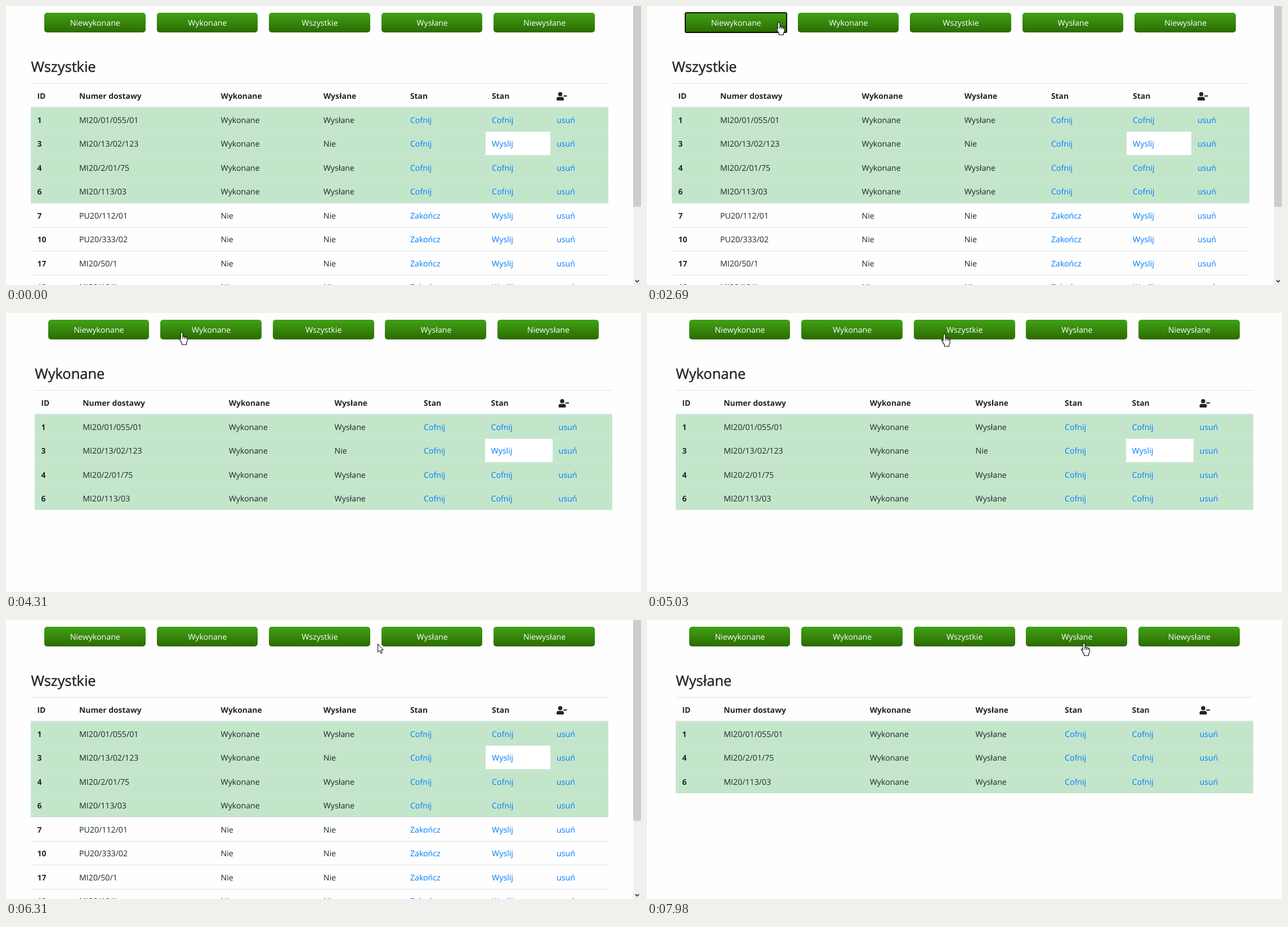
These frames come from a looping animation (1128 by 496 pixels, 8000 ms). An HTML page:

```html
<!DOCTYPE html>
<html lang="pl">
<head>
<meta charset="utf-8">
<title>Dostawy</title>
<style>
  html, body { margin: 0; width: 100%; height: 100%; overflow: hidden; background: #fefefe; }
  svg { display: block; width: 1128px; height: 496px; }
  text { font: 14.2px "Open Sans", "Noto Sans", sans-serif; fill: #212529; text-rendering: geometricPrecision; white-space: pre; }
  .bold { font-size: 13.9px; font-weight: 700; }
  .title { font-size: 25.4px; stroke: #212529; stroke-width: .45; }
  .link { fill: #007bff; }
  .label { fill: #fff; text-anchor: middle; }
  .line { fill: #dee2e6; }
  .focus { fill: none; stroke: #0c0f0a; stroke-width: 2; }
  .cursor { fill: #fff; stroke: #000; stroke-width: 1; stroke-linejoin: round; }
</style>
</head>
<body>
<svg id="stage" viewBox="0 0 1128 496">
  <defs>
    <linearGradient id="green" x2="0" y2="1">
      <stop offset=".05" stop-color="#3fa015"/>
      <stop offset="1" stop-color="#2d6a02"/>
    </linearGradient>
  </defs>
</svg>
<script>
const LOOP = 8000;
const ROW = 42.5;
const TABLE_WIDTH = 1026;
const stage = document.getElementById('stage');

const WIDE = [62.5, 136.3, 395.7, 583.5, 742, 861.5, 981.5];
const SCROLLED = [55.5, 130, 381.5, 563.7, 717.9, 863.1, 978];
const SHIFTED = SCROLLED.map(x => x + 7);

const BUTTONS = ['Niewykonane', 'Wykonane', 'Wszystkie', 'Wysłane', 'Niewysłane'];
const BUTTON = { y: 12, w: 179.7, h: 35, pitch: 199.6 };

// id, delivery number, done, sent
const ROWS = [
  [1, 'MI20/01/055/01', 1, 1],
  [3, 'MI20/13/02/123', 1, 0],
  [4, 'MI20/2/01/75', 1, 1],
  [6, 'MI20/113/03', 1, 1],
  [7, 'PU20/112/01', 0, 0],
  [10, 'PU20/333/02', 0, 0],
  [17, 'MI20/50/1', 0, 0],
  [18, 'MI20/10/1', 0, 0],
  [19, 'MI20/44/2', 0, 0],
  [21, 'PU20/120/03', 0, 0]
];

function add(parent, tag, attrs, content) {
  const el = document.createElementNS('http://www.w3.org/2000/svg', tag);
  for (const key in attrs) el.setAttribute(key, attrs[key]);
  if (content !== undefined) el.textContent = content;
  return parent.appendChild(el);
}

const rect = (parent, x, y, width, height, attrs) =>
  add(parent, 'rect', { x, y, width, height, ...attrs });
const label = (parent, x, y, content, cls = '') =>
  add(parent, 'text', { x, y, class: cls }, content);

function userIcon(parent, x, y) {
  const icon = add(parent, 'g', { transform: `translate(${x} ${y}) scale(.97)`, fill: '#212529' });
  add(icon, 'circle', { cx: 6.7, cy: 3.85, r: 3.85 });
  add(icon, 'path', { d: 'M0 14V12.7A4 4 0 0 1 4 8.7H4.5Q6.7 9.6 8.9 8.7H9.4A4 4 0 0 1 13.4 12.7V14A1.4 1.4 0 0 1 12 15.4H1.4A1.4 1.4 0 0 1 0 14Z' });
  rect(icon, 12.5, 6.2, 6.7, 2, { rx: .5 });
}

function scrollbar(parent) {
  rect(parent, 1114, 0, 14, 496, { fill: '#f0f0f0' });
  rect(parent, 1114, 0, 14, 357, { fill: '#cdcdcd' });
  add(parent, 'path', { d: 'M1118 487.5l3.2 3.2 3.2-3.2', fill: 'none', stroke: '#4a4044', 'stroke-width': 1.8 });
}

function tableRow(parent, row, i, cols, left) {
  const [id, number, done, sent] = row;
  const top = Math.floor(180.5 + ROW * i);
  const height = Math.floor(180.5 + ROW * (i + 1)) - top;
  const base = Math.floor(208 + ROW * i);
  if (done) rect(parent, left, top, TABLE_WIDTH, height, { fill: '#c3e6cb' });
  if (done && !sent) {
    const x = Math.round(cols[5] - 11);
    rect(parent, x, top, Math.round(cols[6] - 11) - x, height, { fill: '#fff' });
  }
  if (i) rect(parent, left, top, TABLE_WIDTH, 1, { class: 'line', opacity: done ? .6 : 1 });
  label(parent, cols[0], base, id, 'bold');
  label(parent, cols[1], base, number);
  label(parent, cols[2], base, done ? 'Wykonane' : 'Nie');
  label(parent, cols[3], base, sent ? 'Wysłane' : 'Nie');
  label(parent, cols[4], base, done ? 'Cofnij' : 'Zakończ', 'link');
  label(parent, cols[5], base, sent ? 'Cofnij' : 'Wyslij', 'link');
  label(parent, cols[6], base, 'usuń', 'link');
}

function makeView(title, cols, rows, scrolls) {
  const g = add(stage, 'g', {});
  const edge = scrolls ? 44.5 : 51.25;
  const left = Math.floor(edge);
  const buttonX = edge + 23.9;

  const focus = BUTTONS.map((name, i) => {
    const start = buttonX + i * BUTTON.pitch;
    const x = Math.floor(start);
    const w = Math.floor(start + BUTTON.w) - x;
    rect(g, x, BUTTON.y, w, BUTTON.h, { rx: 5, fill: 'url(#green)' });
    label(g, start + BUTTON.w / 2, 35, name, 'label');
    return rect(g, x, BUTTON.y, w, BUTTON.h, { rx: 2, class: 'focus' });
  });

  label(g, edge, 117, title, 'title');
  rect(g, left, 137, TABLE_WIDTH, 1, { class: 'line' });
  ['ID', 'Numer dostawy', 'Wykonane', 'Wysłane', 'Stan', 'Stan']
    .forEach((name, i) => label(g, cols[i], 164.5, name, 'bold'));
  userIcon(g, cols[6], 153);
  rows.forEach((row, i) => tableRow(g, row, i, cols, left));
  rect(g, left, 179, TABLE_WIDTH, 2, { class: 'line' });
  if (scrolls) scrollbar(g);
  return { g, focus, buttonX };
}

const done = ROWS.filter(r => r[2]);
const views = {
  all: makeView('Wszystkie', SCROLLED, ROWS.slice(0, 8), true),
  open: makeView('Niewykonane', SHIFTED, ROWS.filter(r => !r[2])),
  done: makeView('Wykonane', WIDE, done),
  sent: makeView('Wysłane', WIDE, done.filter(r => r[3]))
};

// start time, view, focused button
const SCENES = [
  [0, 'all', -1],
  [1960, 'all', 0],
  [2740, 'open', -1],
  [3730, 'open', 1],
  [4200, 'done', -1],
  [5220, 'done', 2],
  [5910, 'all', -1],
  [6880, 'all', 3],
  [7480, 'sent', -1]
];

// start, end, from x, from y, to x, to y
const MOVES = [
  [430, 1260, 950, 498, 424, 124],
  [1270, 1730, 424, 124, 234, 29],
  [3310, 3700, 234, 29, 312, 34],
  [4550, 5200, 312, 34, 572, 38],
  [5640, 5880, 572, 38, 579, 41],
  [5900, 6440, 579, 41, 674, 42],
  [6450, 6850, 674, 42, 709, 41],
  [7740, 7980, 709, 41, 776, 41]
];

const arrow = add(stage, 'g', { class: 'cursor' });
add(arrow, 'path', { d: 'M.5 .5V15.2L3.8 12.2l2.4 5.3 2.2-1-2.4-5.1H10.2Z' });
const hand = add(stage, 'g', { class: 'cursor' });
const handShape = add(hand, 'g', { transform: 'translate(.3 .3) scale(1.05)' });
add(handShape, 'path', { d: 'M-2 12V1.8a1.8 1.8 0 0 1 3.6 0V7.4c.5-1 2.7-.8 2.9.6c.6-1 2.5-.7 2.7.7c.7-.8 2.3-.3 2.3 1.2v3.8c0 2-1.4 3.2-1.7 4.6v2.6h-7.6v-2.2c-1-2-3.2-4.6-4.6-7.6c-.7-1.7 1.3-2.4 2.4-.4z' });
add(handShape, 'path', { d: 'M1.6 7.4v3.6M4.5 8v3.2M7.2 8.7v2.8', fill: 'none' });

const show = (el, on) => el.setAttribute('visibility', on ? 'inherit' : 'hidden');
const ease = p => p * p * (3 - 2 * p);

function pointerAt(t) {
  const move = MOVES.findLast(m => t >= m[0]);
  if (!move) return null;
  const [start, end, x0, y0, x1, y1] = move;
  const p = ease(Math.min(1, (t - start) / (end - start)));
  return { x: x0 + (x1 - x0) * p, y: y0 + (y1 - y0) * p };
}

function overButton(pointer, view) {
  const dx = pointer.x - view.buttonX;
  return pointer.y >= BUTTON.y && pointer.y < BUTTON.y + BUTTON.h &&
    dx >= 0 && dx % BUTTON.pitch < BUTTON.w;
}

function draw(t) {
  const [, name, focused] = SCENES.findLast(s => t >= s[0]);
  for (const key in views) {
    const view = views[key];
    view.g.style.display = key === name ? '' : 'none';
    view.focus.forEach((el, i) => show(el, i === focused));
  }
  const pointer = pointerAt(t);
  const onButton = pointer && overButton(pointer, views[name]);
  show(hand, onButton);
  show(arrow, pointer && !onButton);
  if (pointer) {
    const place = `translate(${Math.round(pointer.x)} ${Math.round(pointer.y)})`;
    hand.setAttribute('transform', place);
    arrow.setAttribute('transform', place);
  }
}

function tick() {
  draw(performance.now() % LOOP);
  requestAnimationFrame(tick);
}
tick();
</script>
</body>
</html>
```
